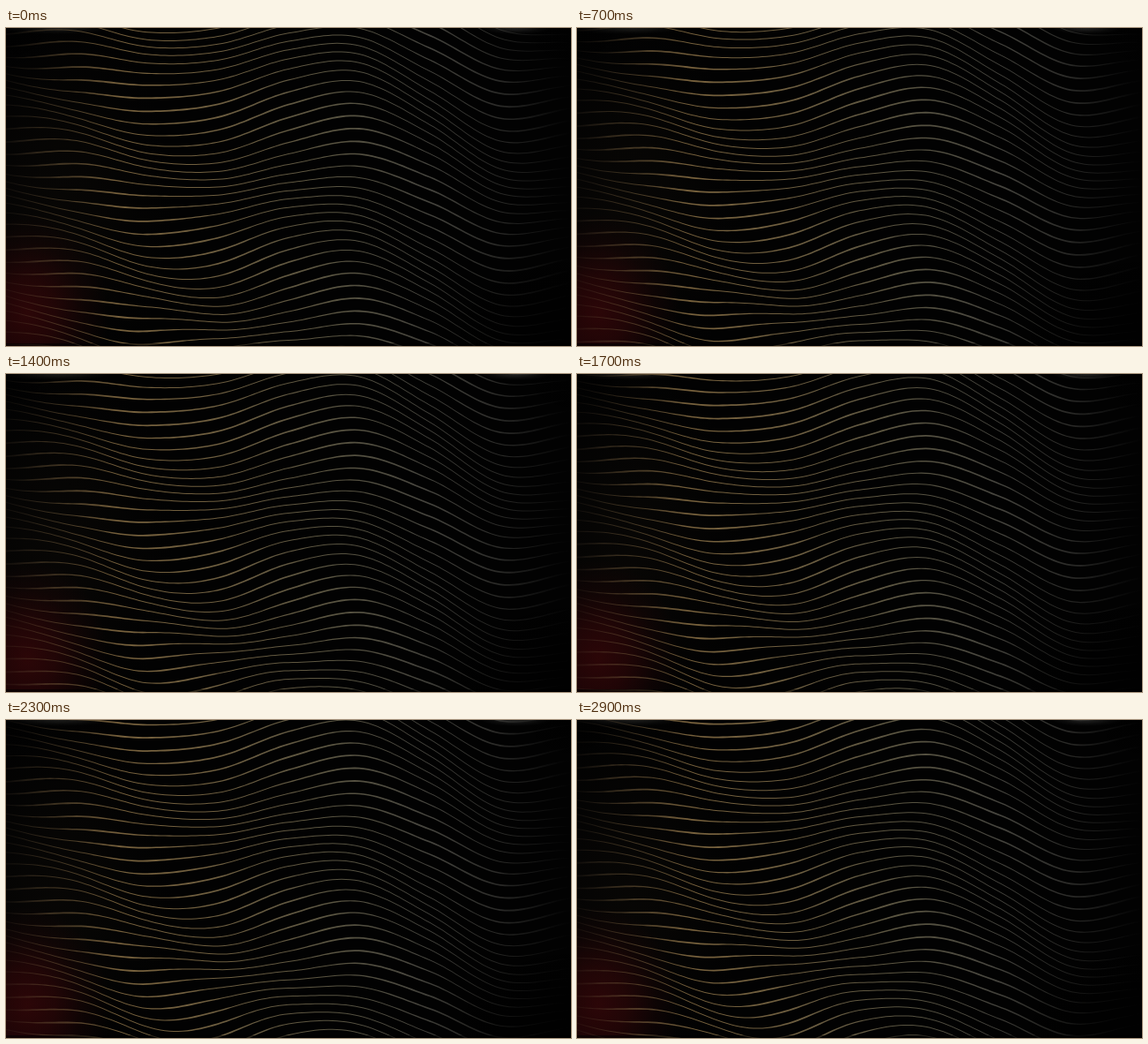
Write an HTML page with a canvas that moves like this. It is 640 by 360 pixels and loops after 3 s.

```html
<!DOCTYPE html>
<html lang="en">
<head>
<meta charset="utf-8">
<title>Golden waves</title>
<style>
  html, body { margin: 0; width: 100%; height: 100%; overflow: hidden; background: #020202; }
  canvas { display: block; width: 640px; height: 360px; }
</style>
</head>
<body>
<canvas id="stage" width="640" height="360"></canvas>
<script>
const W = 640, H = 360, LOOP = 3000, STEP = 100;
const RISE = 25.8; // px per second
const MIDDLE = 13, RIPPLE = 6.5;
const ctx = document.getElementById('stage').getContext('2d');

// Shape of the field, one knot every 80 px across the stage
const KNOT_GAP = 80;
const BASE = [160, 168, 184, 182, 160, 151, 184, 226, 220];          // height of the middle line
const SPACING = [11.1, 11.3, 11.5, 11.7, 11.9, 12, 11.8, 11.6, 11.4]; // mean gap between lines
const RIDGE = [9.3, 12.9, 15.9, 19, 22.7, 26.4, 29.4, 32, 34.5];      // line where the gaps are widest
const PERIOD = [11, 11, 11.6, 13.3, 15, 16, 16, 15.8, 15.5];          // lines between two ridges

function curve(knots, x) {
  const last = knots.length - 1;
  const i = Math.min(Math.floor(x / KNOT_GAP), last - 1);
  const u = x / KNOT_GAP - i;
  const b = knots[i], c = knots[i + 1];
  const a = i ? knots[i - 1] : 2 * b - c;
  const d = i + 2 <= last ? knots[i + 2] : 2 * c - b;
  return b + 0.5 * u * (c - a + u * (2 * a - 5 * b + 4 * c - d + u * (3 * (b - c) + d - a)));
}

const columns = [];
for (let x = 0; x <= W; x += 5) {
  columns.push({
    x,
    base: curve(BASE, x),
    spacing: curve(SPACING, x),
    ridge: curve(RIDGE, x),
    period: curve(PERIOD, x)
  });
}

function horizontal(stops) {
  const g = ctx.createLinearGradient(0, 0, W, 0);
  stops.forEach(([at, color]) => g.addColorStop(at, color));
  return g;
}

function glow(x, y, rx, ry, rgb, alpha) {
  ctx.save();
  ctx.translate(x, y);
  ctx.scale(rx, ry);
  const g = ctx.createRadialGradient(0, 0, 0, 0, 0, 1);
  [[0, 1], [0.35, 0.72], [0.7, 0.24], [1, 0]].forEach(([at, k]) =>
    g.addColorStop(at, `rgba(${rgb},${alpha * k})`));
  ctx.fillStyle = g;
  ctx.fillRect(-1, -1, 2, 2);
  ctx.restore();
}

const lineColor = horizontal([
  [0, 'rgba(90,72,54,0.12)'],
  [0.06, 'rgba(115,92,60,0.4)'],
  [0.2, 'rgba(155,126,78,0.76)'],
  [0.36, 'rgba(148,126,84,0.74)'],
  [0.58, 'rgba(126,119,92,0.7)'],
  [0.75, 'rgba(110,108,98,0.62)'],
  [0.87, 'rgba(95,94,88,0.45)'],
  [0.94, 'rgba(75,75,72,0.25)'],
  [1, 'rgba(50,50,50,0)']
]);

function drawLine(n, lift) {
  const upper = [], lower = [];
  for (const { x, base, spacing, ridge, period } of columns) {
    const phase = 2 * Math.PI * (n - ridge) / period;
    const y = base + spacing * (n - MIDDLE) + RIPPLE * Math.sin(phase) - lift;
    const half = 0.5 + 0.42 * Math.max(0, Math.cos(phase)) ** 2;
    upper.push([x, y - half]);
    lower.unshift([x, y + half]);
  }
  ctx.beginPath();
  upper.concat(lower).forEach(([x, y]) => ctx.lineTo(x, y));
  ctx.fill();
}

function draw(ms) {
  ctx.fillStyle = '#020202';
  ctx.fillRect(0, 0, W, H);
  glow(60, 200, 130, 220, '32,25,16', 0.18);
  glow(24, 322, 92, 112, '70,8,11', 0.6);
  glow(55, 0, 65, 7, '70,70,66', 0.4);
  glow(578, 0, 40, 7, '80,80,78', 0.45);

  ctx.fillStyle = lineColor;
  const lift = RISE * ms / 1000;
  for (let n = -10; n < 44; n++) drawLine(n, lift);

  // Darkened corners
  glow(640, 360, 200, 150, '0,0,0', 0.75);
  glow(640, 0, 110, 90, '0,0,0', 0.4);
  glow(0, 0, 90, 70, '0,0,0', 0.45);
  ctx.fillStyle = 'rgba(0,0,0,0.55)';
  ctx.fillRect(0, 357, W, 3);
}

function tick() {
  const ms = performance.now() % LOOP;
  draw(Math.floor(ms / STEP) * STEP);
  requestAnimationFrame(tick);
}
tick();
</script>
</body>
</html>
```
